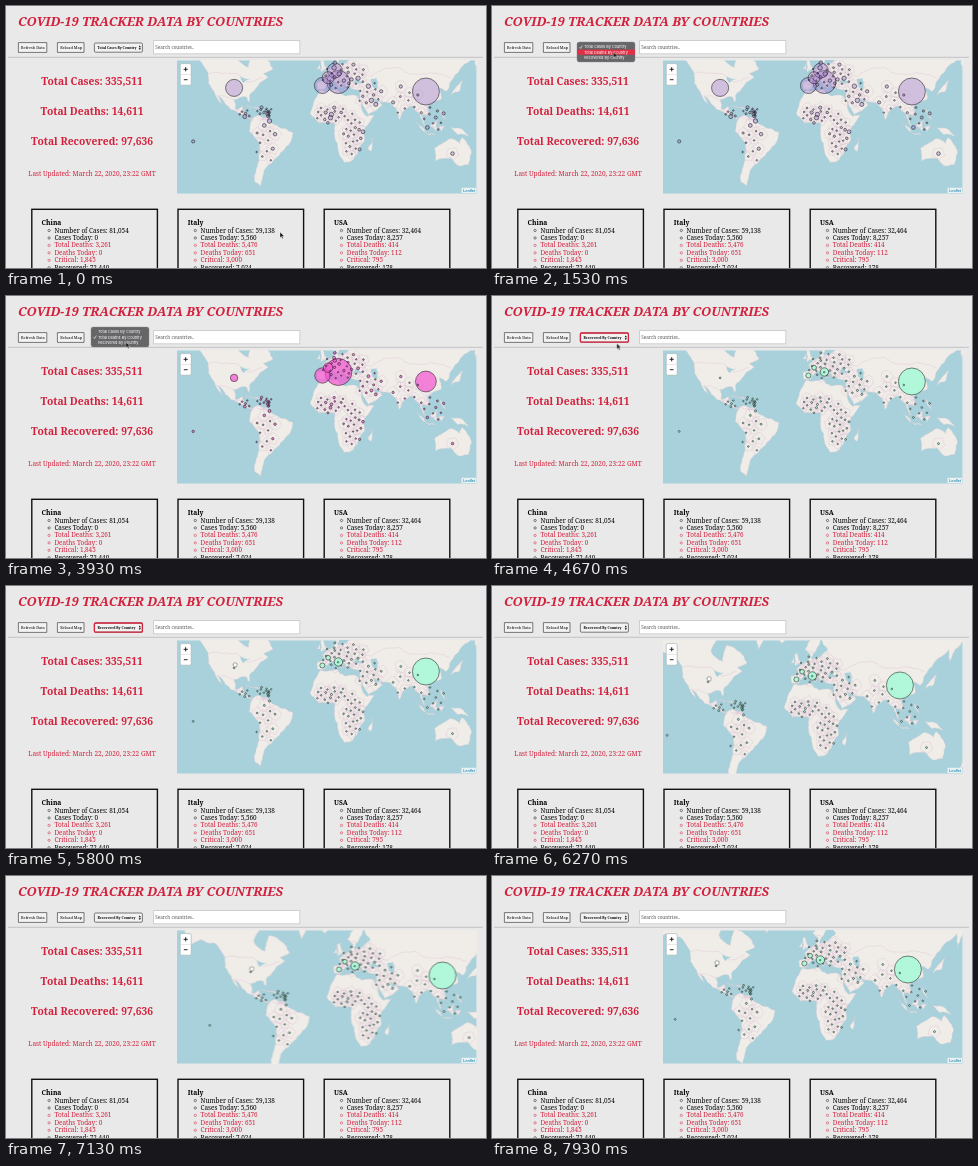
An HTML page for the animation above (8 s loop, 480 by 262 pixels).

```html
<!DOCTYPE html>
<html lang="en">
<head>
<meta charset="utf-8">
<title>Tracker</title>
<style>
html, body { margin: 0; width: 100%; height: 100%; overflow: hidden; background: #e9e9e9; }
svg { display: block; width: 100vw; height: 100vh; }
text { font-family: "Noto Serif", serif; white-space: pre; }
.red { fill: #d3203c; }
.bold { font-weight: bold; }
.mid { text-anchor: middle; }
.sans { font: 3.8px Inter, sans-serif; fill: #fff; }
.land { fill: #f0ece8; stroke: #d9cdd4; stroke-width: .4; }
.water { fill: #a8d1db; }
.borders { fill: none; stroke: #ddc5d6; stroke-width: .45; }
.dots { stroke: #1c1c1c; stroke-width: .55; }
.pan { animation: pan 8s linear infinite; }
.cursor { animation: cursor 8s ease-in-out infinite; }

@keyframes cursor {
  0%, .8% { transform: translate(274px, 226px) }
  10.9% { transform: translate(140px, 55px) }
  13.4%, 16.6% { transform: translate(124px, 42px) }
  19.1%, 25% { transform: translate(121.5px, 46px) }
  33%, 42.5% { transform: translate(123px, 42px) }
  46.6%, 57.5% { transform: translate(119.8px, 46px) }
  63.4%, to { transform: translate(229px, 76px) }
}
@keyframes pan {
  0%, 73.1% { transform: none }
  78.8% { transform: translate(-13px, 15px) }
  82.5%, 83.3% { transform: translate(-15px, 19px) }
  89.1%, 90% { transform: translate(16.6px, 14px) }
  97.5%, to { transform: translate(-4px, 8px) }
}
</style>
</head>
<body>
<svg viewBox="0 0 480 262" preserveAspectRatio="none">
  <clipPath id="frame"><path d="M171 54.5H470.4V187.4H171Z"/></clipPath>
  <text class="red bold" x="12" y="20" font-size="12.8" font-style="italic">COVID-19 TRACKER DATA BY COUNTRIES</text>

  <g fill="#f2f2f2" stroke="#444" stroke-width=".7">
    <path d="M12.4 36.6H40.8V46.4H12.4ZM51.4 36.6H78V46.4H51.4Z"/>
    <rect x="88.4" y="37" width="48" height="9.2" rx="1.2"/>
    <path d="M147.5 34.5H293.8V47.8H147.5Z" fill="#fff" stroke="#b5b5b5" stroke-width=".6"/>
  </g>
  <rect class="focus" x="88.4" y="37" width="48" height="9.2" rx="1.2" fill="none" stroke="#d3243d" stroke-width="1.3"/>
  <g font-size="3.9">
    <text x="15" y="43">Refresh Data</text>
    <text x="54.2" y="43">Reload Map</text>
    <g class="bold" font-size="3.4">
      <text class="cases" x="91.4" y="42.8">Total Cases By Country</text>
      <text class="deaths" x="91.4" y="42.8">Total Deaths By Country</text>
      <text class="recovered" x="91.4" y="42.8">Recovered By Country</text>
    </g>
    <text x="149.3" y="42.8" font-size="4.6" fill="#555">Search countries..</text>
  </g>
  <path d="M132.7 41.2L133.8 39.4L134.9 41.2ZM132.7 42.2L133.8 44L134.9 42.2Z"/>
  <path d="M2 51.3H477" stroke="#b9b9b9" stroke-width=".8"/>

  <g class="red bold mid" font-size="10.3">
    <text x="86" y="79">Total Cases: 335,511</text>
    <text x="86" y="109">Total Deaths: 14,611</text>
    <text x="86" y="139.2">Total Recovered: 97,636</text>
  </g>
  <text class="red mid" x="86" y="170" font-size="6.5">Last Updated: March 22, 2020, 23:22 GMT</text>

  <g clip-path="url(#frame)">
    <path class="water" d="M171 54H471V188H171Z"/>
    <g class="pan" id="world"></g>
  </g>
  <rect x="174.2" y="57.6" width="11" height="21.6" rx="1.5" fill="#fff" stroke="#a9b3b6" stroke-width=".7"/>
  <path d="M174.2 68.4H185.2" stroke="#ccc" stroke-width=".5"/>
  <path d="M177.6 63.3H181.8M179.7 61.2V65.4M177.8 73.7H181.6" stroke="#111" stroke-width=".9"/>
  <path d="M455.5 181.8H470V187H455.5Z" fill="#e8f1f3"/>
  <text x="457" y="186" style="font:4px 'Liberation Sans',sans-serif" fill="#0078a8">Leaflet</text>

  <g id="cards"></g>
  <g id="menus"></g>

  <g class="pan"><g class="cursor">
    <path class="arrow" d="M0 0V5.8L1.4 4.6L2.3 6.7L3.3 6.2L2.4 4.2H4.2Z" fill="#111" stroke="#fff" stroke-width=".4"/>
    <path class="hand" d="M-1.6 1.2Q-1 .2-.6 1Q0 .2.5 1Q1.1.4 1.5 1.3Q2.2 1 2.2 2L1.7 4.8H-1L-2.2 2.9Q-2 2-1.6 2.6Z" fill="#fff" stroke="#333" stroke-width=".4"/>
  </g></g>
</svg>
<script>
const LOOP = 8000;
const $ = id => document.getElementById(id);

let seed = 7;
const random = () => (seed = seed * 16807 % 2147483647) / 2147483647;

// Times in ms at which a part turns on, off, on, ...
const toggles = {
  cases: [0, 2000], deaths: [2000, 4130], recovered: [4130],
  menu1: [1330, 2000], menu2: [3400, 4060], focus: [1330, 5930],
  row1a: [1330, 1460], row1b: [1460, 1870, 1930, 2000],
  row2a: [3400, 3600], row2b: [3600, 3930, 4000, 4060],
  arrow: [0, 4880], hand: [4880]
};
const rules = Object.entries(toggles).map(([name, times]) => {
  const steps = times.map((t, i) => `${t / LOOP * 100}%{visibility:${i % 2 ? "hidden" : "visible"}}`);
  const end = times.length % 2 ? "visible" : "hidden";
  return `.${name}{visibility:hidden;animation:${name} ${LOOP}ms step-end infinite}` +
    `@keyframes ${name}{0%{visibility:hidden}${steps.join("")}to{visibility:${end}}}`;
});
document.head.appendChild(document.createElement("style")).textContent = rules.join("");

// Web Mercator
const project = (lon, lat) => [
  320.2 + .95 * lon,
  121 - 54.4 * Math.log(Math.tan(Math.PI / 4 + lat * Math.PI / 360))
];
const points = text => text.split(",").map(pair => project(...pair.trim().split(" ").map(Number)));

// Midpoint displacement turns a few key points into a natural line
function roughen(a, b, depth) {
  if (!depth) return [b];
  const dx = b[0] - a[0], dy = b[1] - a[1], shift = (random() - .5) * .22;
  const mid = [(a[0] + b[0]) / 2 - dy * shift, (a[1] + b[1]) / 2 + dx * shift];
  return [...roughen(a, mid, depth - 1), ...roughen(mid, b, depth - 1)];
}
function rough(keys, closed, depth = 3) {
  const all = closed ? [...keys, keys[0]] : keys;
  const line = all.slice(1).flatMap((p, i) => roughen(all[i], p, depth));
  return "M" + [all[0], ...line].map(p => p.map(v => v.toFixed(1)).join(" ")).join("L") + (closed ? "Z" : "");
}
const outlines = (list, closed) => list.map(text => rough(points(text), closed)).join("");

const lands = outlines([
  "-168 66,-156 71,-95 69,-82 67,-94 59,-82 53,-78 62,-65 59,-56 52,-66 49,-61 46,-70 42,-81 31,-81 25,-84 30,-97 28,-96 18,-88 21,-83 10,-78 8,-95 16,-106 23,-114 31,-110 23,-117 32,-124 42,-124 49,-135 58,-150 60,-164 55",
  "-78 8,-72 12,-62 10,-50 0,-35 -6,-39 -18,-48 -26,-58 -36,-65 -41,-69 -53,-75 -50,-71 -30,-70 -18,-81 -5",
  "-6 36,10 37,20 31,33 31,37 20,43 11,51 12,40 -4,40 -15,35 -22,28 -33,19 -35,12 -17,9 4,-8 4,-17 14,-10 30",
  "-9 43,-9 37,-2 37,3 42,9 44,16 38,18 40,13 45,19 42,23 37,24 41,27 37,36 36,35 28,44 13,59 22,56 26,52 24,48 30,57 26,67 25,73 20,77 8,80 15,91 22,95 16,99 13,104 1,101 13,109 11,106 20,121 28,119 38,126 35,131 43,141 52,156 60,157 51,163 60,179 65,179 70,110 73,70 72,40 67,26 71,12 65,5 60,11 57,8 54,-4 48,-1 44",
  "114 -22,124 -16,131 -12,140 -17,143 -11,153 -26,150 -37,140 -38,131 -31,115 -34",
  "-44 60,-22 70,-40 78,-54 70", "-24 65,-14 65,-19 63", "-5 50,1 52,-3 58,-6 57", "-10 52,-6 52,-7 55",
  "49 -12,47 -25,44 -22", "131 32,140 35,144 44,140 41", "95 5,105 -6,100 -2", "105 -6,115 -8,108 -8",
  "109 1,117 7,116 -4", "119 1,125 1,121 -5", "131 -1,145 -4,150 -10,138 -8", "120 18,126 7,121 13",
  "173 -35,178 -38,167 -46", "-85 22,-69 19,-77 20"
], true);
const lakes = outlines(["28 42,31 46,40 42,35 42", "47 45,53 46,54 37,49 39", "12 54,21 56,29 60,22 65,17 60", "-91 47,-80 45,-87 42"], true);
const frontiers = outlines([
  "-123 49,-95 49,-83 43,-67 46", "-117 32,-106 31,-97 26",
  "28 58,38 49,48 47,60 52,75 53,87 49,117 49,131 46", "75 38,80 31,97 28,107 21"
]);

// Countries: centre, half extent in degrees, count
const regions = [
  [4, 13, 18, 9, 17], [28, -8, 11, 23, 22], [18, 47, 24, 10, 30], [47, 32, 14, 11, 13], [82, 27, 16, 15, 9],
  [112, 10, 14, 14, 11], [-86, 14, 6, 5, 6], [-66, 17, 9, 4, 9], [-61, 14, 1, 4, 6], [-63, -14, 12, 23, 13],
  [133, -27, 0, 0, 1], [-140, -15, 0, 0, 1]
];
const GOLDEN = Math.PI * (3 - Math.sqrt(5));
const spots = regions.flatMap(([lon, lat, w, h, count]) => Array.from({ length: count }, (_, i) => {
  const radius = Math.sqrt((i + random()) / count), angle = i * GOLDEN;
  return { at: project(lon + w * radius * Math.cos(angle), lat + h * radius * Math.sin(angle)), size: random() };
}));
const cells = spots.map(({ at: [x, y], size }) => {
  const corners = Array.from({ length: 5 }, (_, i) => {
    const angle = i * Math.PI * .4 + size * 6, r = 4 + 3 * size;
    return [x + r * Math.cos(angle), y + r * Math.sin(angle)];
  });
  return rough(corners, true, 2);
}).join("");

// Area of a large circle is proportional to its count
const outbreaks = [
  { at: [105, 35], cases: 81054, deaths: 3261, recovered: 72440 },
  { at: [12.8, 42.8], cases: 59138, deaths: 5476, recovered: 7024 },
  { at: [-97, 38], cases: 32464, deaths: 414, recovered: 178 },
  { at: [-4, 40], cases: 28603, deaths: 1772, recovered: 2575 },
  { at: [9, 51], cases: 24873, deaths: 94, recovered: 266 },
  { at: [2, 46], cases: 16018, deaths: 674, recovered: 2200 }
];
const circle = ([x, y], r) => `<circle cx="${x.toFixed(1)}" cy="${y.toFixed(1)}" r="${r.toFixed(2)}"/>`;
const layer = (name, fill, spread) => {
  const max = Math.max(...outbreaks.map(o => o[name]));
  const large = outbreaks.map(o => circle(project(...o.at), Math.max(.9, 13.5 * Math.sqrt(o[name] / max))));
  const rest = spots.map(s => circle(s.at, .75 + spread * s.size ** 3));
  return `<g class="dots ${name}" fill="${fill}">${large.join("")}${rest.join("")}</g>`;
};
$("world").innerHTML =
  `<clipPath id="coast"><path d="${lands}"/></clipPath>` +
  `<path class="land" d="${lands}"/>` +
  `<path class="borders" clip-path="url(#coast)" d="${cells}${frontiers}"/>` +
  `<path class="water" d="${lakes}"/>` +
  layer("cases", "rgba(158,118,206,.38)", 1.6) +
  layer("deaths", "rgba(243,84,208,.7)", .8) +
  layer("recovered", "rgba(164,250,214,.85)", .3);

const labels = ["Number of Cases", "Cases Today", "Total Deaths", "Deaths Today", "Critical", "Recovered"];
const card = (name, values, column) => {
  const x = 25.8 + 146.2 * column;
  const rows = values.split(" ").map((value, i) => {
    const y = 226.5 + 7.45 * i, red = i > 1 && i < 5;
    return `<circle cx="${x + 17.3}" cy="${y - 2}" r="1.15" fill="none" stroke="${red ? "#d3203c" : "#111"}" stroke-width=".5"/>` +
      `<text class="${red ? "red" : ""}" x="${x + 22.6}" y="${y}" font-size="6.4">${labels[i]}: ${value}</text>`;
  });
  return `<rect x="${x}" y="203.3" width="125.6" height="80" fill="none" stroke="#111" stroke-width="1.4"/>` +
    `<text class="bold" x="${x + 9.8}" y="219.2" font-size="6.7">${name}</text>${rows.join("")}`;
};
$("cards").innerHTML =
  card("China", "81,054 0 3,261 0 1,845 72,440", 0) +
  card("Italy", "59,138 5,560 5,476 651 3,000 7,024", 1) +
  card("USA", "32,464 8,257 414 112 795 178", 2);

const options = ["Total Cases By Country", "Total Deaths By Country", "Recovered By Country"];
const menu = (name, y, checked, bars) => {
  const marks = bars.map((bar, i) =>
    `<rect class="${bar}" x="85" y="${y + 2.5 + 5.1 * (checked + i)}" width="58" height="5.1" fill="#e32f45"/>`);
  const rows = options.map((text, i) => `<text class="sans" x="92.2" y="${y + 6.4 + 5.1 * i}">${text}</text>`);
  const tick = `<path d="M87.6 ${y + 5.1 + 5.1 * checked}l1 1.3l1.7 -2.9" fill="none" stroke="#fff" stroke-width=".6"/>`;
  return `<g class="${name}"><rect x="85" y="${y}" width="58" height="20" rx="2.2" fill="#666568" stroke="#8c8c8c" stroke-width=".4"/>` +
    marks.join("") + rows.join("") + tick + "</g>";
};
$("menus").innerHTML = menu("menu1", 36, 0, ["row1a", "row1b"]) + menu("menu2", 31, 1, ["row2a", "row2b"]);
</script>
</body>
</html>
```
